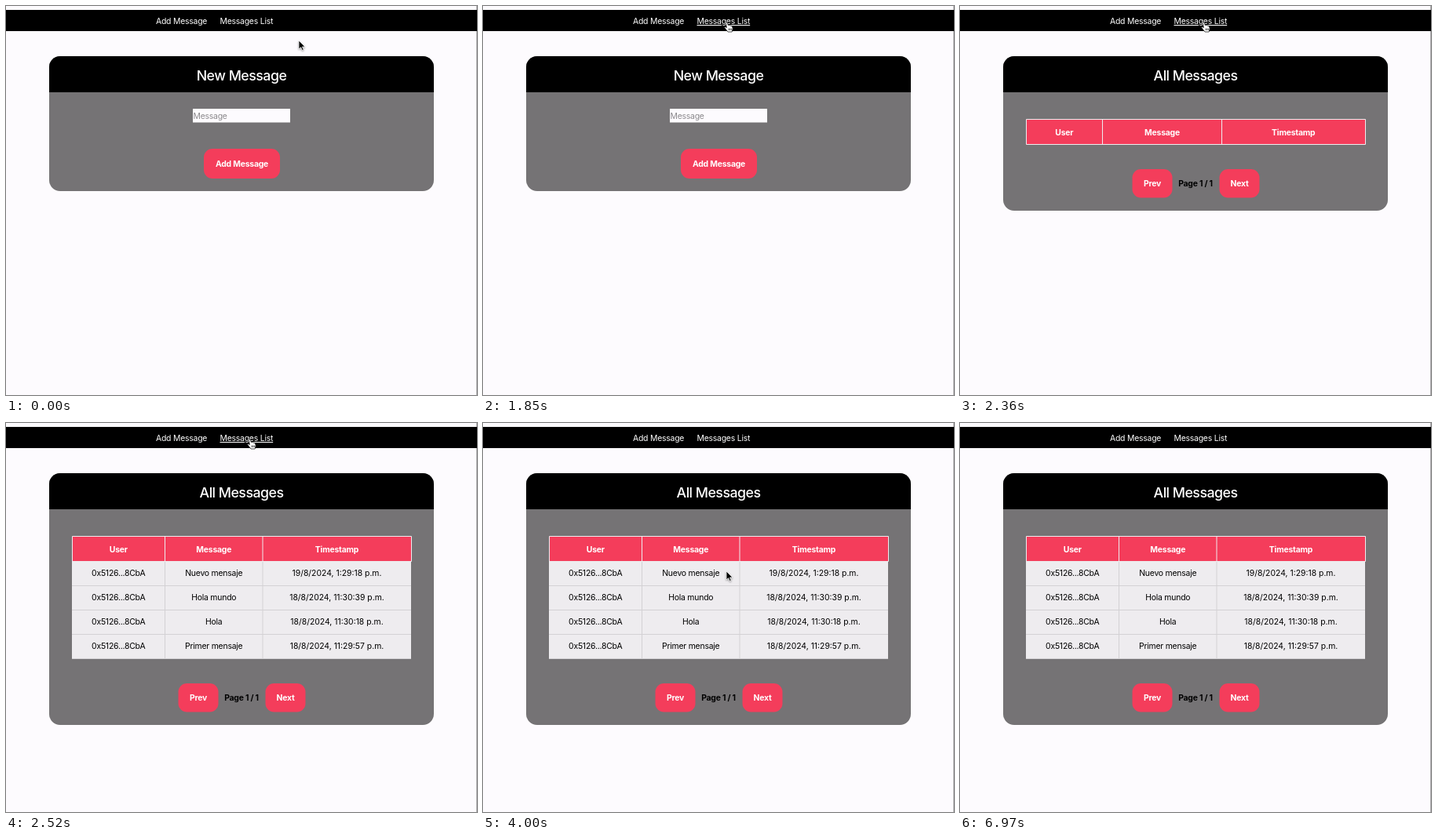
Write an HTML page that moves like this. It is 600 by 496 pixels and loops after 7 s.

```html
<!DOCTYPE html>
<html lang="en">
<head>
<meta charset="utf-8">
<style>
  html, body { margin: 0; width: 600px; height: 496px; overflow: hidden; background: #fdfbfe; }
  svg { display: block; }
  text { font: 10.4px Inter, "Open Sans", sans-serif; letter-spacing: -.02em; text-anchor: middle; }
  .nav { fill: #fff; text-anchor: start; }
  .title { font-size: 17.8px; font-weight: 500; letter-spacing: -.03em; fill: #fff; }
  .bold { font-weight: 700; }
  .light { fill: #fff; }
  .hint { fill: #8b898c; text-anchor: start; }
  .time { letter-spacing: 0; }
  .hover { text-decoration: underline; }
</style>
</head>
<body>
<svg width="600" height="496" viewBox="0 0 600 496">
  <path d="M599.5 0V496" stroke="#aaa8ab"/>
  <rect y="5" width="600" height="27"/>
  <text class="nav" x="191" y="23">Add Message</text>
  <text class="nav" id="link" x="272.5" y="23">Messages List</text>
  <g id="pages"></g>
  <g id="cursor" stroke-linejoin="round">
    <path id="arrow" d="M0 0V11L2.6 8.7 4.4 12.6 6.2 11.8 4.5 8H8Z" stroke="#fff" stroke-width=".8"
      style="filter: drop-shadow(0 1px 1px #0006)"/>
    <path id="hand" d="M-1 1.2Q0 -.6 1.2 1L2.2 4.5Q3.2 3.8 4 4.8Q5.2 4.3 5.8 5.3Q7.2 5 7.6 6.3L8.2 9Q7.6 11 7.2 13H2Q-.5 10 -2.4 7.6Q-2 6 .4 7.4Z M3 8.5V11M4.7 8.5V11M6.3 8.5V11"
      fill="#fff" stroke="#000" stroke-width=".7"/>
  </g>
</svg>
<script>
const LOOP = 7000, RED = '#f43d5b';
const $ = id => document.getElementById(id);

const text = (x, y, label, cls = '') => `<text x="${x}" y="${y}" class="${cls}">${label}</text>`;
const rect = (x, y, w, h, fill, r = 0) =>
  `<rect x="${x}" y="${y}" width="${w}" height="${h}" rx="${r}" fill="${fill}"/>`;
const button = (x, y, w, h, label) =>
  rect(x, y, w, h, RED, 11) + text(x + w / 2, y + h / 2 + 4, label, 'bold light');

const card = (title, bottom) =>
  rect(55, 64, 490, bottom - 64, '#757375', 14) +
  '<path d="M55 110V78a14 14 0 0 1 14-14H531a14 14 0 0 1 14 14V110Z"/>' +
  text(300, 94.7, title, 'title');

const form = card('New Message', 236) + rect(238, 131, 124, 17.5, '#fdfbfe') +
  text(238.5, 143.7, 'Message', 'hint') + button(252, 182, 97, 38, 'Add Message');

function list(rows, columns) {
  const [a, b] = columns, end = 176 + rows.length * 31, shift = end - 176;
  const centers = [(84 + a) / 2, (a + b) / 2, (b + 516) / 2];
  const line = (d, color) => `<path d="${d}" fill="none" stroke="${color}"/>`;
  let out = card('All Messages', 261 + shift) + rect(84, 144.5, 432, 32, RED);
  if (rows.length) out += rect(84, 176, 432, shift, '#eeecef');
  ['User', 'Message', 'Timestamp'].forEach((name, i) =>
    out += text(centers[i], 164.5, name, 'bold light'));
  rows.forEach((row, r) => {
    const y = 176 + r * 31;
    row.forEach((cell, i) => out += text(centers[i], y + 19.3, cell, i == 2 ? 'time' : ''));
    out += line(`M84 ${y + 31.5}H516`, '#d3d1d4');
  });
  if (rows.length) out += line(`M${a} 176V${end}M${b} 176V${end}`, '#d3d1d4');
  out += line(`M84.5 144.5H516.5V176.5H84.5ZM${a} 144V176M${b} 144V176`, '#eeecef');
  return out + button(219.5, 208 + shift, 51, 36.5, 'Prev') +
    text(300, 229.8 + shift, 'Page 1 / 1', 'bold') + button(330.5, 208 + shift, 51, 36.5, 'Next');
}

const user = '0x5126...8CbA';
const messages = [
  [user, 'Nuevo mensaje', '19/8/2024, 1:29:18 p.m.'],
  [user, 'Hola mundo', '18/8/2024, 11:30:39 p.m.'],
  [user, 'Hola', '18/8/2024, 11:30:18 p.m.'],
  [user, 'Primer mensaje', '18/8/2024, 11:29:57 p.m.']
];

// Each page is shown from its start time until the next one begins.
const pages = [
  [0, form],
  [1880, card('All Messages', 178)],
  [2360, list([], [181.5, 333.5])],
  [2450, list(messages, [202.5, 327])]
];
$('pages').innerHTML = pages.map(([, body]) => `<g>${body}</g>`).join('');
const groups = [...$('pages').children];

// Pointer stops: time, x, y
const path = [
  [0, 373, 44], [520, 373, 44], [1210, 310, 20], [2940, 310, 20],
  [3390, 306, 198], [3670, 306, 198], [4000, 310, 189], [4490, 310, 189],
  [5020, 606, 182], [LOOP, 606, 182]
];

function pointerAt(t) {
  const i = path.findIndex(stop => stop[0] > t);
  const [t0, x0, y0] = path[i - 1], [t1, x1, y1] = path[i];
  const p = (t - t0) / (t1 - t0), k = p * p * (3 - 2 * p);
  return [x0 + (x1 - x0) * k, y0 + (y1 - y0) * k];
}

function draw(now) {
  const t = now % LOOP, [x, y] = pointerAt(t);
  const hover = y < 27 && x > 272 && x < 342;
  const page = pages.filter(([start]) => start <= t).length - 1;
  groups.forEach((g, i) => g.style.display = i == page ? '' : 'none');
  $('cursor').setAttribute('transform', `translate(${x} ${y})`);
  $('link').classList.toggle('hover', hover);
  $('hand').style.display = hover ? '' : 'none';
  $('arrow').style.display = hover ? 'none' : '';
}

const start = performance.now();
function tick() {
  draw(performance.now() - start);
  requestAnimationFrame(tick);
}
tick();
</script>
</body>
</html>
```
